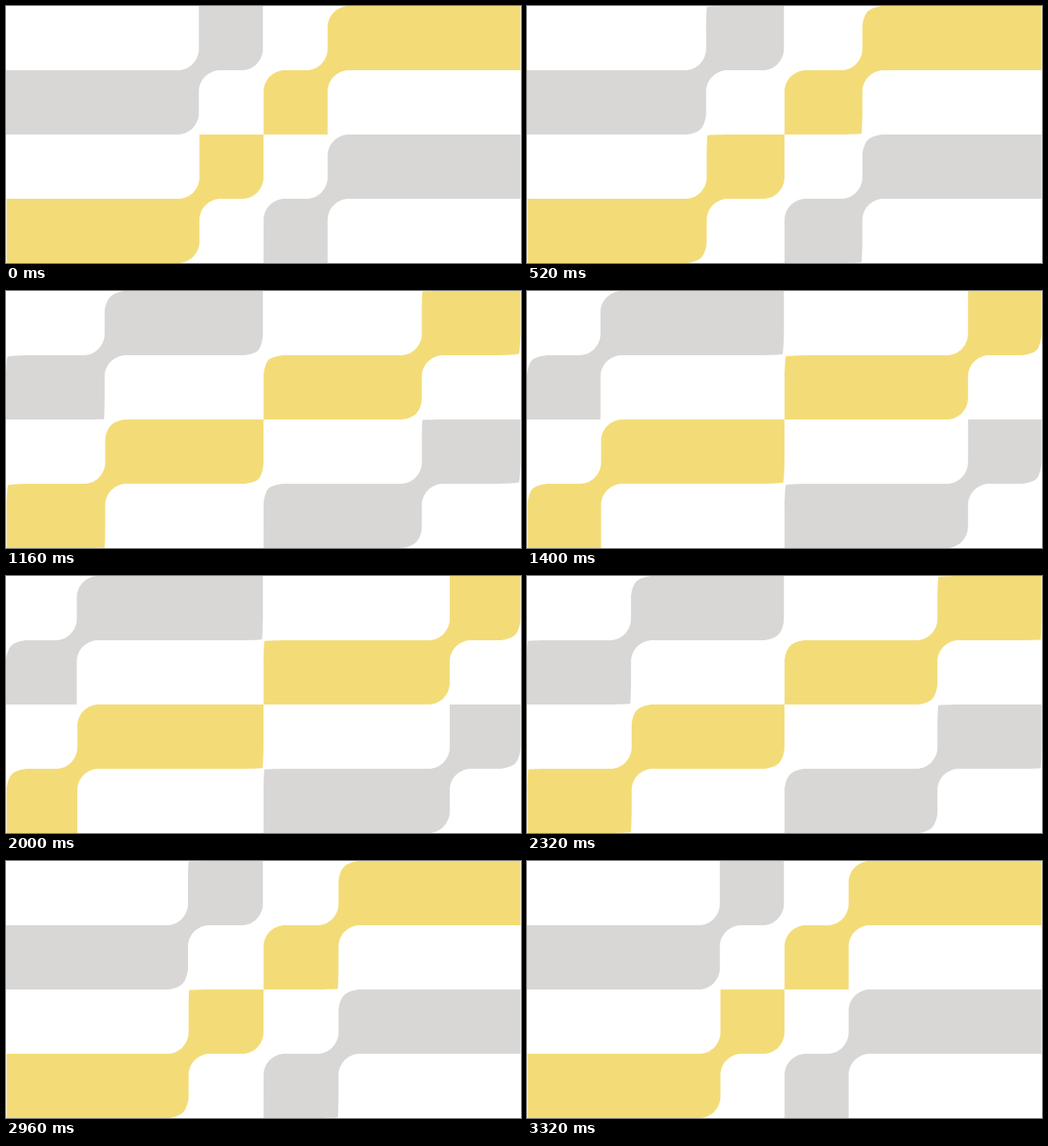
Write an HTML page that moves like this. It is 600 px wide and 300 px high and loops after 5 s.

```html
<!DOCTYPE html>
<html lang="en">
<head>
<meta charset="utf-8">
<title>Sliding bands</title>
<style>
  html, body { margin: 0; width: 100%; height: 100%; overflow: hidden; background: #fff; }
  svg { display: block; width: 100%; height: 100%; }
  .gray { fill: #d8d7d5; }
  .yellow { fill: #f3dc78; }
</style>
</head>
<body>
<svg viewBox="0 0 600 300">
  <defs><path id="band"/></defs>
  <use href="#band" class="gray"/>
  <use href="#band" class="yellow" transform="translate(.7 150)"/>
  <use href="#band" class="yellow" transform="translate(599.4 150) rotate(180)"/>
  <use href="#band" class="gray" transform="translate(599.4 300) rotate(180)"/>
</svg>
<script>
const LOOP = 5000, STEP = 40;
const START = 140, TRAVEL = 1520, MIRROR = 1720;
const WIDTH = 299.3, R = 25;
const RIGHT = [1, 0], LEFT = [-1, 0], UP = [0, -1], DOWN = [0, 1];

const band = document.getElementById('band');
const clamp = v => Math.min(1, Math.max(0, v));

// Cubic bezier easing with control points (.466, 0) and (.623, 1).
function ease(u) {
  let lo = 0, hi = 1;
  for (let i = 0; i < 24; i++) {
    const s = (lo + hi) / 2, r = 1 - s;
    const x = 3 * .466 * r * r * s + 3 * .623 * r * s * s + s ** 3;
    if (x < u) lo = s; else hi = s;
  }
  return lo * lo * (3 - 2 * lo);
}

// Corner at (cx, cy) between two directions; round runs from 0 (square) to 1 (arc).
function corner(cx, cy, from, to, round) {
  const at = (a, b) => `${(cx + R * (a * from[0] + b * to[0])).toFixed(2)} ${(cy + R * (a * from[1] + b * to[1])).toFixed(2)}`;
  const mid = .293 * round, handle = .265 * round, diagonal = .1875 * round;
  return `L${at(-1, 0)}
    C${at(handle - 1, 0)} ${at(-mid - diagonal, mid - diagonal)} ${at(-mid, mid)}
    C${at(diagonal - mid, mid + diagonal)} ${at(0, 1 - handle)} ${at(0, 1)}`;
}

function bandPath(p) {
  const x = 224.7 - 150 * p;
  const inner = clamp(p / .8);
  const outer = clamp((p - .65) / .35);
  return 'M0 150' +
    corner(0, 75, UP, RIGHT, outer) +
    corner(x, 75, RIGHT, UP, 1) +
    corner(x, 0, UP, RIGHT, inner) +
    `L${WIDTH} 0` +
    corner(WIDTH, 75, DOWN, LEFT, 1 - outer) +
    corner(x, 75, LEFT, DOWN, 1) +
    corner(x, 150, DOWN, LEFT, 1 - inner) + 'Z';
}

function draw() {
  const time = Math.floor(performance.now() % LOOP / STEP) * STEP;
  const forward = time < MIRROR ? time : 2 * MIRROR - time;
  band.setAttribute('d', bandPath(ease(clamp((forward - START) / TRAVEL))));
  requestAnimationFrame(draw);
}
draw();
</script>
</body>
</html>
```
